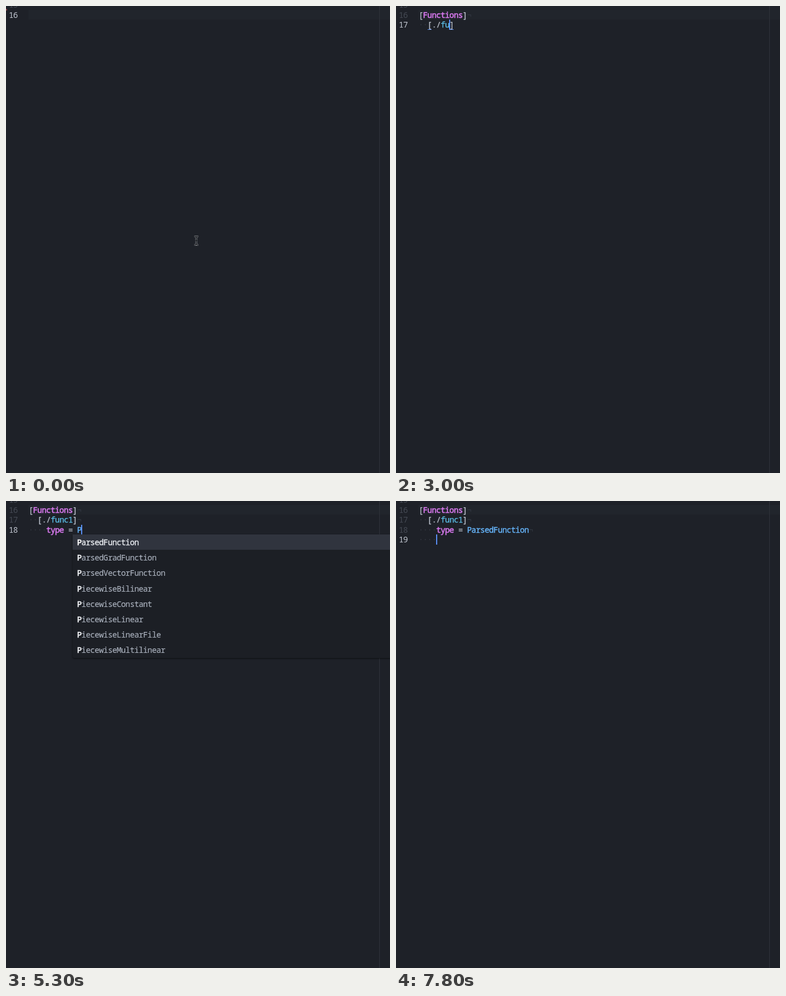
Write an HTML page that moves like this. It is 680 px wide and 824 px high and loops after 8 s.

```html
<!DOCTYPE html>
<html lang="en">
<head>
<meta charset="utf-8">
<title>Editor autocomplete</title>
<style>
  html, body { margin: 0; width: 100%; height: 100%; overflow: hidden; background: #1e2128; }
  #stage { position: relative; width: 680px; height: 824px; overflow: hidden; background: #1e2128;
    font: 14px/17.4px "Noto Sans Mono", "DejaVu Sans Mono", monospace; letter-spacing: -.6px; color: #bdc3ce; }
  #stage div, #stage svg { position: absolute; }
  #active { left: 40px; top: 7px; width: 640px; height: 17px; background: #21252c; }
  #ruler { left: 661px; top: 0; width: 1px; height: 824px; background: #2f333b; }
  .num { left: 5px; color: #454a54; }
  .num.on { color: #c3c8d2; }
  .row { left: 40px; white-space: pre; -webkit-text-stroke: .25px; }
  .inv { color: #343942; -webkit-text-stroke: 0; }
  .key { color: #d678ec; -webkit-text-stroke: .6px; }
  .name { color: #5cc0ea; }
  .val { color: #66b5fb; -webkit-text-stroke: .4px; }
  .pair { box-shadow: inset 0 -1px #528bff; }
  .caret { width: 2px; height: 18px; background: #5a8ff5; }
  .pop { background: #1c1f25; box-shadow: 0 1px 3px rgba(0, 0, 0, .6); border-radius: 3px; }
  .pop .item { left: 0; right: 0; height: 27.2px; line-height: 27.2px; white-space: pre; color: #a9b0bc;
    -webkit-text-stroke: .15px; }
  .pop .item b { color: #f0f2f5; font-weight: 400; -webkit-text-stroke: .7px; }
  .pop .sel { background: #30343e; color: #e6e9ee; -webkit-text-stroke: .4px; }
  .pop .sel b { color: #fff; }
  .label { left: 7.8px; }
  .icon + .label { left: 37px; }
  .icon { width: 27px; height: 27.2px; background: #2b2d38; }
  .desc { left: -1px; right: -2px; background: #15181c; border-radius: 0 0 5px 5px; white-space: pre;
    font: 600 12.2px/29px "Noto Sans", "Open Sans", sans-serif; letter-spacing: 0; color: #b4bac6; text-indent: 9px; }
</style>
</head>
<body>
<div id="stage">
  <div id="active"></div>
  <div id="ruler"></div>
  <div class="num" style="top:-10.8px">15</div>
  <div id="view"></div>
  <div id="speck" style="left:0;top:5px;width:2px;height:3px;background:#843c42"></div>
  <svg id="mouse" style="left:332px;top:404px" width="10" height="20" fill="none">
    <path d="M1.5 2.5H3.5L5 4L6.5 2.5H8.5M5 4V16M1.5 17.5H3.5L5 16L6.5 17.5H8.5M3.5 10H6.5" stroke="#8b8e93" stroke-width="3"/>
    <path d="M1.5 2.5H3.5L5 4L6.5 2.5H8.5M5 4V16M1.5 17.5H3.5L5 16L6.5 17.5H8.5M3.5 10H6.5" stroke="#15171b" stroke-width="1.4"/>
  </svg>
</div>
<script>
const CW = 7.8, LH = 17.4, TOP = 6.8, ITEM = 27.2, LOOP = 8000;
const $ = id => document.getElementById(id);
const span = (cls, s) => s ? `<span class="${cls}">${s}</span>` : '';

const list = (typed, col, names, more) => ({ typed, col, names, width: 194, ...more });
const block = (typed, names) => list(typed, 0, names, { desc: '' });
const param = typed => list(typed, 4, ['type'], { icon: true, width: 451,
  desc: 'A string representing the Moose Object that will be built by this Action' });
const types = ['ParsedFunction', 'ParsedGradFunction', 'ParsedVectorFunction', 'PiecewiseBilinear',
  'PiecewiseConstant', 'PiecewiseLinear', 'PiecewiseLinearFile', 'PiecewiseMultilinear'];
const kinds = typed => list(typed, 11, types.filter(n => typed !== 'Par' || /a.*r/.test(n)), { width: 580 });

// Each step: start time, text ("|" caret shown, "!" caret hidden), popup
const A = '[Functions]\n', B = A + '  [./func1]\n', C = B + '    type = ', D = C + 'ParsedFunction';
const steps = [
  [0, '!'],
  [700, '|'],
  [900, '[|]'],
  [1100, '[F|]', block('[F', ['[Functions]', '[InterfaceKernels]'])],
  [1200, '[Fu|]', block('[Fu', ['[Functions]'])],
  [1400, '[Functions]|'],
  [1700, A + '  |'],
  [2000, A + '  !'],
  [2200, A + '  [|]'],
  [2300, A + '  [./|]'],
  [2400, A + '  [./|]', list('[./', 2, ['[./*]'], { desc: '' })],
  [2600, A + '  [./f|]'],
  [2800, A + '  [./fu|]'],
  [3100, A + '  [./fun|]'],
  [3200, A + '  [./func|]'],
  [3400, A + '  [./func!]'],
  [3600, A + '  [./func1|]'],
  [3700, A + '  [./func1]|'],
  [3900, B + '    |'],
  [4200, B + '    t|'],
  [4300, B + '    t|', param('t')],
  [4400, B + '    ty|', param('ty')],
  [4700, C + '|'],
  [5000, C + '!'],
  [5200, C + 'P|'],
  [5300, C + 'P|', kinds('P')],
  [5400, C + 'Pa|', kinds('Pa')],
  [5500, C + 'Par|', kinds('Par')],
  [5900, C + 'Par!', kinds('Par')],
  [6200, C + 'Par|', kinds('Par')],
  [6500, C + 'Par!', kinds('Par')],
  [6600, D + '|'],
  [6900, D + '\n    |'],
  [7400, D + '\n    !'],
  [7800, D + '\n    |']
];

function paint(text, live) {
  const [, pad, body] = text.match(/^( *)(.*)$/);
  const dots = span('inv', '·'.repeat(pad.length));
  const blk = body.match(/^(\[)(\.\/)?(\w*)(\])$/);
  if (blk) {
    const [, open, dir = '', name, close] = blk, cls = live ? 'pair' : '';
    return dots + span(cls, open) + dir + span(dir ? 'name' : 'key', name) + span(cls, close);
  }
  const set = body.match(/^(\w+)( = )(\w*)$/);
  return dots + (set ? span('key', set[1]) + set[2] + span('val', set[3]) : body);
}

// Bold the typed letters, taken in order
function mark(name, typed) {
  let k = 0;
  return [...name].map(c => k < typed.length && c.toLowerCase() === typed[k].toLowerCase()
    ? (k++, `<b>${c}</b>`) : c).join('');
}

function gear() {
  const teeth = [0, 45, 90, 135].map(a =>
    `<rect x="-1.4" y="-6" width="2.8" height="12" transform="rotate(${a})"/>`).join('');
  return `<svg style="left:7px;top:7px" width="13" height="13" viewBox="-6.5 -6.5 13 13" fill="#c678dd">${teeth}` +
    '<circle r="4.3"/><circle r="2" fill="#2b2d38"/></svg>';
}

function popup(p, row) {
  const left = 40 + p.col * CW - (p.icon ? 37 : 7.8), high = p.names.length * ITEM;
  const items = p.names.map((n, i) => `<div class="item${i ? '' : ' sel'}" style="top:${i * ITEM}px">` +
    (p.icon ? `<div class="icon">${gear()}</div>` : '') +
    `<div class="label">${mark(n, p.typed)}</div></div>`).join('');
  const desc = p.desc === undefined ? '' :
    `<div class="desc" style="top:${high}px;height:${p.desc ? 30 : 16}px">${p.desc}</div>`;
  return `<div class="pop" style="left:${left}px;top:${TOP + (row + 1) * LH}px;` +
    `width:${p.width}px;height:${high}px">${items}${desc}</div>`;
}

function render([t, text, pop]) {
  const lines = text.split('\n'), last = lines.length - 1;
  const col = lines[last].search(/[|!]/);
  let html = lines.map((line, i) => {
    const y = TOP + i * LH;
    return `<div class="num${i === last ? ' on' : ''}" style="top:${y}px">${16 + i}</div>` +
      `<div class="row" style="top:${y}px">${paint(line.replace(/[|!]/, ''), i === last)}` +
      `${i < last ? span('inv', '¬') : ''}</div>`;
  }).join('');
  if (text.includes('|'))
    html += `<div class="caret" style="left:${40 + col * CW - .4}px;top:${TOP + last * LH}px"></div>`;
  $('view').innerHTML = html + (pop ? popup(pop, last) : '');
  $('mouse').style.display = t < 900 ? '' : 'none';
  $('speck').style.display = t < 1100 ? '' : 'none';
}

let shown;
function tick() {
  const now = performance.now() % LOOP;
  const step = steps.findLast(s => s[0] <= now);
  if (step !== shown) render(shown = step);
  requestAnimationFrame(tick);
}
tick();
</script>
</body>
</html>
```
